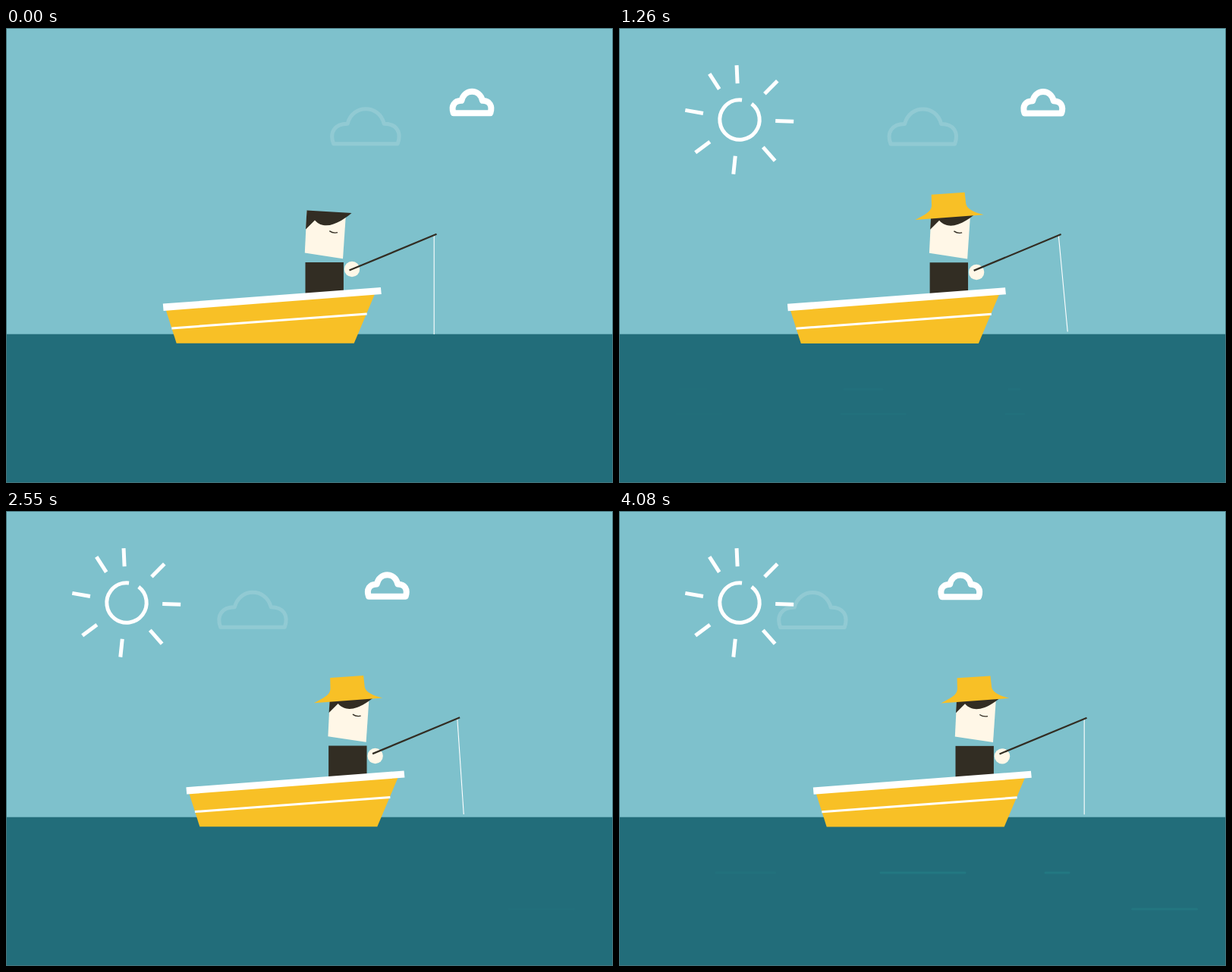
Recreate the animation shown at these times as an HTML page. Size 800 by 600 pixels, loop 4110 ms.

```html
<!DOCTYPE html>
<html lang="en">
<head>
<meta charset="utf-8">
<title>Fishing boat</title>
<style>
  html, body { margin: 0; width: 100%; height: 100%; overflow: hidden; background: #7ec1cc; }
  svg { display: block; width: 800px; height: 600px; }
  .cloud { fill: none; stroke: #fff; stroke-linejoin: round; }
  #sun { fill: none; stroke: #fff; stroke-width: 5; }
  #waves { stroke: #257f87; stroke-width: 3; stroke-linecap: round; }
</style>
</head>
<body>
<svg viewBox="0 0 800 600">
  <defs>
    <path id="puff" d="M-42 0C-48 -15.5 -40 -26.5 -23.5 -26.5C-17 -52.5 18 -52.5 24.5 -26.5C41 -26.5 48 -15.5 42.5 0Z" vector-effect="non-scaling-stroke"/>
  </defs>
  <rect width="800" height="600" fill="#7ec1cc"/>
  <rect y="403.7" width="800" height="197" fill="#226d7a"/>
  <g id="waves"></g>

  <g id="sun">
    <circle id="ring" r="26.2" pathLength="360"/>
    <g id="rays" transform="translate(158.2 121)"></g>
  </g>
  <g id="farCloud" class="cloud" stroke-width="5" opacity=".15"><use href="#puff"/></g>
  <g id="nearCloud" class="cloud" stroke-width="8"><use href="#puff" transform="scale(.575 .62)"/></g>

  <g id="boat">
    <rect x="394.5" y="309" width="50.4" height="45" fill="#322d23"/>
    <path d="M210.8 372L486 351L458.7 415.7H224.7Z" fill="#f8c026"/>
    <path d="M218.3 396L475.7 377" stroke="#fff" stroke-width="3"/>
    <path d="M206.8 363.6L493.9 341.9L494.8 351L207.6 373Z" fill="#fff"/>
    <path d="M396.5 241L448 245L444 304.2L393.8 296.6Z" fill="#fff7e7"/>
    <path d="M396.5 240.5L455.5 244C440 257 420 268 407 253.5L395 265.5Z" fill="#322d23"/>
    <path d="M426.3 267.6Q431 271 437 269.7" fill="none" stroke="#322d23" stroke-width="1.3"/>
    <path id="hat" d="M-45.3 0C-33 -5 -23 -9 -22.3 -17L-21.6 -31.5L22.4 -31.2L23 -16C24 -9 33 -4 45.3 0Z" fill="#f8c026"/>
    <line id="line" x1="564.2" y1="273.5" stroke="#fff" stroke-width="1.1"/>
    <circle id="hand" cx="456" r="10.2" fill="#fff7e7"/>
    <path d="M452.5 319.6L567.5 271.8" stroke="#322d23" stroke-width="2.2"/>
  </g>
  <rect x=".5" y=".5" width="799" height="599" fill="none" stroke="#48757d"/>
</svg>
<script>
const LOOP = 4110, STEP = 30, INTRO = 60;
const $ = id => document.getElementById(id);

function set(el, attrs) {
  for (const name in attrs) el.setAttribute(name, attrs[name]);
}

function add(parent, tag) {
  return parent.appendChild(document.createElementNS("http://www.w3.org/2000/svg", tag));
}

// Damped swing from 0 that settles at 1.
function spring(t, decay, speed) {
  const u = Math.max(0, t - INTRO);
  return 1 - Math.exp(-decay * u) * Math.cos(speed * u);
}

// Share of the intro still to go, from 1 to 0.
const rest = t => Math.min(1, Math.max(0, 1 - (t - INTRO) / 652));

const rays = Array.from({ length: 8 }, () => add($("rays"), "line"));
const ripples = [];

function ripple(peak, life, x, y, width, strength = .5) {
  ripples.push({ peak, life, x, y, width, strength, el: add($("waves"), "line") });
}

// Three evenly spaced dashes on one line of water.
function rippleRow(peak, x, y, width) {
  [.7, 1, .28].forEach((size, i) =>
    ripple(peak, 420, x + 217 * i, y, width * size, i ? .65 : .22));
}

rippleRow(900, 73, 509, 84);
rippleRow(1620, 83, 476.5, 50);
rippleRow(2040, -51, 460.5, 71);
rippleRow(4080, 128, 477, 111);
ripple(2040, 420, 595, 557, 56);
ripple(3030, 420, 31, 555, 63);
ripple(3550, 1100, 672, 525, 85, .65);

function drawSun(t) {
  const reach = spring(t, .006, .0121), spread = spring(t, .0075, .0087);
  rays.forEach((ray, i) => set(ray, {
    y1: -48 * reach, y2: -72 * reach,
    transform: `rotate(${-2.5 + 47.1 * i * spread})`
  }));
  const drawn = 1 - rest(t) ** 3;
  set($("ring"), {
    "stroke-dasharray": `${329.5 * drawn} 360`,
    transform: `translate(159 121) rotate(${-244 + 191 * drawn})`
  });
  set($("sun"), { visibility: t > INTRO ? "visible" : "hidden" });
}

function drawClouds(t) {
  const c = Math.min(t, 3750), sink = c * .00022;
  set($("farCloud"), { transform: `translate(${473.7 - c * .0584} ${152.7 + sink})` });
  set($("nearCloud"), { transform: `translate(${613.9 - c * .0438} ${112.3 + sink})` });
}

function drawBoat(t) {
  const drop = 4.5 * Math.min(t / 1500, 1);
  const sway = 14.2 * Math.min(t / 1500, (4080 - t) / 2580);
  const r = rest(t);
  set($("boat"), { transform: `translate(${t * .01201} ${t * .00021})` });
  set($("hand"), { cy: 318 + drop });
  set($("line"), { x2: 564.2 + sway, y2: 404 - drop });
  set($("hat"), {
    transform: `translate(${420.4 - 5.2 * r} ${249.3 - 262 * r ** 3}) ` +
      `rotate(${-4.2 + 26.4 * r}) scale(1 ${1 - .62 * r})`,
    visibility: t > INTRO ? "visible" : "hidden"
  });
}

function drawRipples(t) {
  for (const { peak, life, x, y, width, strength, el } of ripples) {
    const u = (t - peak) / life, left = x + (t - peak) * .0086;
    set(el, {
      x1: left, x2: left + width, y1: y, y2: y,
      opacity: strength * Math.max(0, 1 - u * u)
    });
  }
}

const start = performance.now();
function frame() {
  const now = Math.max(0, performance.now() - start) % LOOP;
  const t = Math.floor(now / STEP) * STEP;
  drawSun(t);
  drawClouds(t);
  drawBoat(t);
  drawRipples(t);
  requestAnimationFrame(frame);
}
frame();
</script>
</body>
</html>
```
